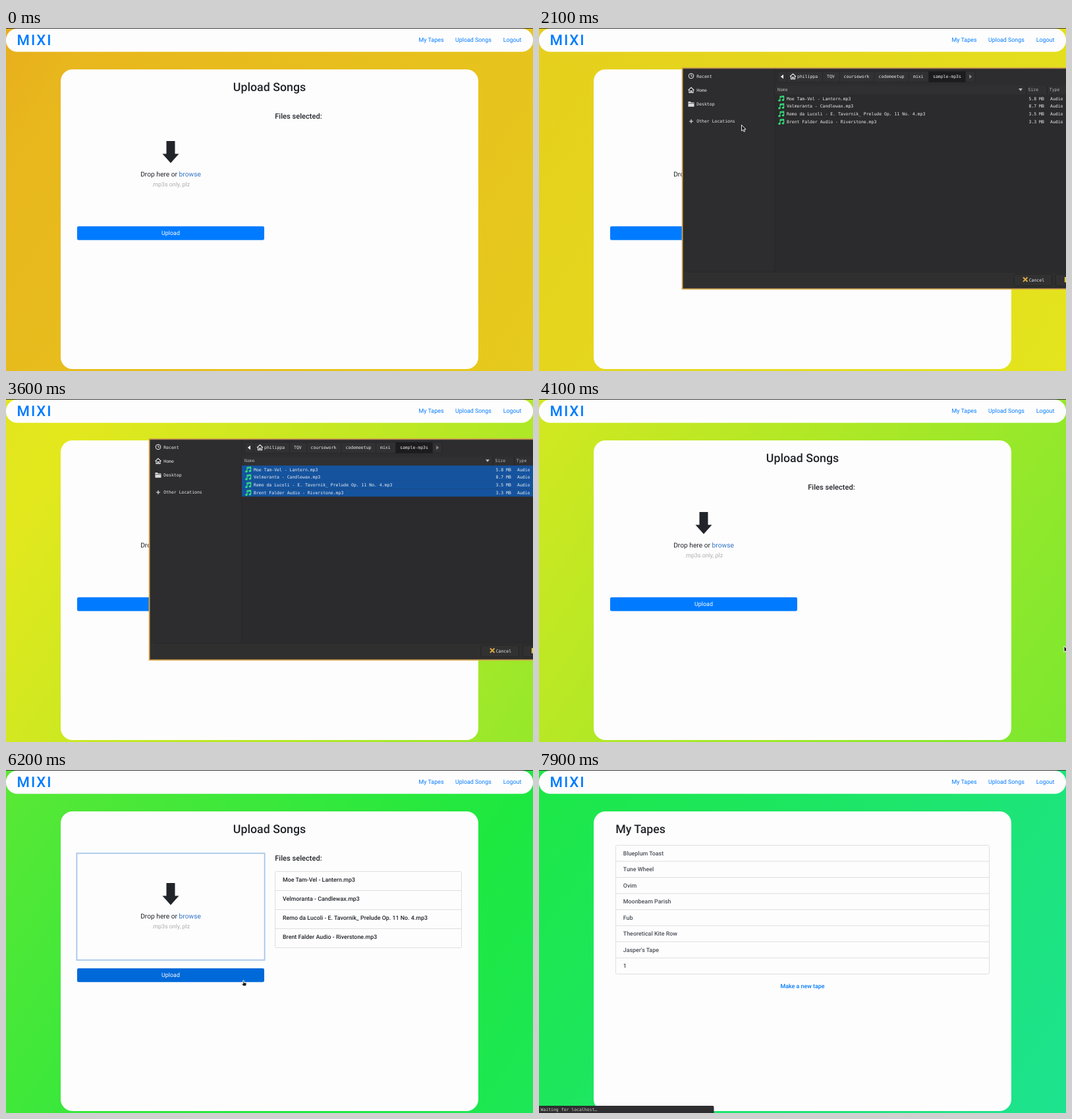
These frames come from a looping animation (800 by 522 pixels, 8000 ms). An HTML page:

```html
<!DOCTYPE html>
<html lang="en">
<head>
<meta charset="utf-8">
<title>Upload Songs</title>
<style>
html, body { margin: 0; width: 100%; height: 100%; overflow: hidden; background: #333; }
svg { display: block; width: 800px; height: 522px; text-rendering: geometricPrecision; }
text { font-family: Roboto, sans-serif; white-space: pre; }
.med { font-weight: 500; }
.mono { font-family: "DejaVu Sans Mono", monospace; }
</style>
</head>
<body>
<svg id="stage" viewBox="0 0 800 522" xmlns="http://www.w3.org/2000/svg">
  <defs>
    <linearGradient id="rainbow" gradientUnits="userSpaceOnUse">
      <stop offset=".125" stop-color="#e81d1d"/>
      <stop offset=".25" stop-color="#e8b71d"/>
      <stop offset=".375" stop-color="#e3e81d"/>
      <stop offset=".5" stop-color="#1de840"/>
      <stop offset=".625" stop-color="#1ddde8"/>
    </linearGradient>
    <g id="note" fill="none" stroke="#35e27c" stroke-width="1.2">
      <path d="M3 7.5V1.2L8.6 .6V6.6M3 2.6L8.6 2"/>
      <ellipse cx="1.9" cy="7.5" rx="1.2" ry=".9" fill="#35e27c"/>
      <ellipse cx="7.4" cy="6.7" rx="1.2" ry=".9" fill="#35e27c"/>
    </g>
    <path id="house" d="M0 4.6L4.5 .5L9 4.6M1.5 4V8.5H3.7V5.6H5.3V8.5H7.5V4" fill="none" stroke="#eee" stroke-width="1.1"/>
  </defs>
</svg>
<script>
const NS = "http://www.w3.org/2000/svg";
const stage = document.getElementById("stage");
const rainbow = document.getElementById("rainbow");
const LOOP = 8000, STEP = 100;
const REM = 800 / 90;
const INK = "#212529", BLUE = "#007bff", PAPER = "#fefdfe";

function add(parent, tag, attrs, content) {
  const el = document.createElementNS(NS, tag);
  for (const k in attrs) el.setAttribute(k, attrs[k]);
  if (content) el.textContent = content;
  parent.appendChild(el);
  return el;
}
const group = parent => add(parent, "g", {});
const rect = (p, x, y, width, height, fill, more) =>
  add(p, "rect", { x, y, width, height, fill, ...more });
const path = (p, d, fill, more) => add(p, "path", { d, fill, ...more });
const text = (p, x, y, str, size = REM, fill = INK, more = {}) =>
  add(p, "text", { x, y, "font-size": size, fill, ...more }, str);
const mono = (p, x, y, str, fill = "#eee") => text(p, x, y, str, 6.48, fill, { class: "mono" });
const med = { class: "med" };
const mid = { "text-anchor": "middle" };

function listBox(p, x, y, w, row, items, ink, pad, drop) {
  const line = { stroke: "#dfdfdf", "stroke-width": 1 };
  rect(p, x, y, w, row * items.length, "none", { rx: 2, ...line });
  items.forEach((item, i) => {
    if (i) path(p, `M${x} ${y + row * i}h${w}`, "none", line);
    text(p, x + pad, y + row * i + drop, item, REM, ink, med);
  });
}

const songs = [
  ["Moe Tam-Vel - Lantern.mp3", "5.8 MB"],
  ["Velmoranta - Candlewax.mp3", "8.7 MB"],
  ["Remo da Lucoli - E. Tavornik_ Prelude Op. 11 No. 4.mp3", "3.5 MB"],
  ["Brent Falder Audio - Riverstone.mp3", "3.3 MB"]
];
const tapes = ["Blueplum Toast", "Tune Wheel", "Ovim", "Moonbeam Parish", "Fub",
  "Theoretical Kite Row", "Jasper's Tape", "1"];

// Page frame
rect(stage, 0, 0, 800, 522, "#3a3a3a");
rect(stage, 0, 1, 800, 521, "url(#rainbow)");
rect(stage, 0, 1, 800, 35.3, PAPER, { rx: 17 });
text(stage, 16.6, 26, "MIXI", 2.5 * REM, BLUE, { ...med, "letter-spacing": 1.9 });
[[626.6, "My Tapes"], [682, "Upload Songs"], [754.7, "Logout"]]
  .forEach(([x, s]) => text(stage, x, 21.2, s, REM, BLUE));
rect(stage, 83, 63, 634, 456, PAPER, { rx: 18 });

// Upload page
const upload = group(stage);
text(upload, 400, 96.3, "Upload Songs", 2 * REM, INK, { ...med, ...mid });
text(upload, 408.2, 137.9, "Files selected:", 1.25 * REM, INK, med);
const zone = rect(upload, 107.4, 126.7, 285.2, 162.6, "none", { stroke: "#a6c5ea", "stroke-width": 1.8 });
path(upload, "M243.5 172H256.5V191.5H262.5L250 205.5L237.5 191.5H243.5Z", INK);
const prompt = text(upload, 250, 225.5, "Drop here or ", 1.15 * REM, INK, mid);
add(prompt, "tspan", { fill: "#3174c4" }, "browse");
text(upload, 250, 240.6, ".mp3s only, plz", REM, "#adadad", mid);
const button = rect(upload, 108, 301.8, 284, 21, BLUE, { rx: 2.2 });
text(upload, 250, 315.2, "Upload", REM, "#fff", mid);
const picked = group(upload);
listBox(picked, 408.5, 154.5, 283, 29, songs.map(s => s[0]), INK, 11.5, 15.3);

// Tapes page
const tapePage = group(stage);
text(tapePage, 116.2, 96.3, "My Tapes", 2 * REM, INK, med);
listBox(tapePage, 116.5, 114.5, 567, 24.5, tapes, "#495057", 11.3, 15.3);
text(tapePage, 400, 332.2, "Make a new tape", REM, BLUE, { ...med, ...mid });
const status = group(stage);
path(status, "M0 511H263.5Q265.5 511 265.5 513V522H0Z", "#2f2e30");
mono(status, 2.5, 518.8, "Waiting for localhost…", "#d0d0d0");

// File chooser
const dialog = group(stage);
rect(dialog, 217.6, 60.8, 600, 336.4, "#2d2c2e", { stroke: "#d3a64e", "stroke-width": 1.8 });
rect(dialog, 219, 62.2, 581, 1, "#3a393b");
rect(dialog, 358, 87.5, 442, 13.5, "#302f31");
rect(dialog, 358, 101, 442, 269.5, "#2b2a2c");
rect(dialog, 219, 370.5, 581, 25.5, "#2f2f2f");
rect(dialog, 225, 371, 575, .8, "#262626");
rect(dialog, 357.4, 62.5, .8, 308, "#262527");

add(dialog, "circle", { cx: 231, cy: 73, r: 3.8, fill: "none", stroke: "#eee", "stroke-width": 1 });
path(dialog, "M231 70.6V73.3H233", "none", { stroke: "#eee", "stroke-width": .9 });
add(dialog, "use", { href: "#house", x: 226.5, y: 90 });
path(dialog, "M226.5 112H230L231 113.2H235.5V119.8H226.5Z", "#ddd");
path(dialog, "M227 114.7H235.5", "none", { stroke: "#2d2c2e", "stroke-width": .7 });
path(dialog, "M228 142H234M231 139V145", "none", { stroke: "#eee", "stroke-width": 1.1 });
[[75.5, "Recent"], [96.8, "Home"], [118.2, "Desktop"], [144.2, "Other Locations"]]
  .forEach(([y, s]) => mono(dialog, 239.3, y, s));

rect(dialog, 362, 66, 300, 16.5, "#313032", { rx: 2, stroke: "#252426", "stroke-width": .7 });
rect(dialog, 591, 66, 56.5, 16.5, "#1c1b1d");
[376, 430, 456, 508.5, 561, 591, 647.5].forEach(x => rect(dialog, x, 66, .7, 16.5, "#252426"));
path(dialog, "M371 70.8V77.2L366.8 74Z", "#eee");
path(dialog, "M653.2 70.8V77.2L657.2 74Z", "#888");
add(dialog, "use", { href: "#house", x: 381, y: 69.3 });
[[392, "philippa"], [437, "TQV"], [462.5, "coursework"], [515.5, "codemeetup"], [568, "mixi"], [598, "sample-mp3s"]]
  .forEach(([x, s]) => mono(dialog, x, 76.4, s));

[[362, "Name"], [742.5, "Size"], [774.8, "Type"]].forEach(([x, s]) => mono(dialog, x, 96.4, s, "#b5b5b5"));
path(dialog, "M728 92H734L731 96Z", "#bbb");
const bars = songs.map(([name, size], i) => {
  const y = 101.2 + 11.8 * i;
  const bar = rect(dialog, 358, y, 442, 11.9, "#15539e");
  add(dialog, "use", { href: "#note", x: 363, y: y + 1.6 });
  mono(dialog, 376, y + 8.4, name);
  mono(dialog, 743.5, y + 8.4, size);
  mono(dialog, 776, y + 8.4, "Audio");
  return bar;
});
[739, 771].forEach(x => rect(dialog, x, 88, .7, 13, "#1f1e20"));

[[721, 57.5], [784, 40]].forEach(([x, w]) =>
  rect(dialog, x, 374.5, w, 18, "#313132", { rx: 2, stroke: "#222", "stroke-width": .8 }));
path(dialog, "M735 379.5L741.5 386M741.5 379.5L735 386", "none", { stroke: "#d9ab3c", "stroke-width": 2 });
mono(dialog, 743.7, 386.3, "Cancel");
rect(dialog, 797.8, 379, 2.2, 8, "#e3c04c");

// Pointers
const outline = { stroke: "#fff", "stroke-width": .9, "stroke-linejoin": "round" };
const arrow = path(stage, "M0 0V9.2L2.1 7.3L3.6 10.4L5.1 9.7L3.7 6.7H6.5Z", "#1a1a1a", outline);
const hand = path(stage, "M-.8 -3.6Q0 -4.4 .7 -3.6V-.6L4 0Q4.8 .3 4.6 1.4L4 4.8H-.4L-3 1.4Q-2.6 .4 -.8 1.6Z", "#1a1a1a", outline);

// [time, x, y]
const moves = [
  [700, 804, 262], [1000, 560, 240], [1300, 300, 198], [1500, 243, 187], [1900, 243, 187],
  [2300, 372, 108], [2400, 372, 108], [2700, 390, 142], [3000, 390, 142],
  [3600, 806, 383], [4000, 806, 381], [4100, 797, 376], [4500, 768, 374], [5300, 768, 374],
  [5900, 400, 330], [6200, 360.5, 324], [7300, 360.5, 324]
];
// [time, position along the rainbow]
const drift = [[0, .243], [1600, .29], [2900, .345], [4100, .385], [5100, .42], [6200, .461], [7900, .504]];

function track(keys, t, col) {
  const i = keys.findIndex(k => k[0] > t);
  if (i === 0) return keys[0][col];
  if (i < 0) return keys[keys.length - 1][col];
  const a = keys[i - 1], b = keys[i];
  return a[col] + (b[col] - a[col]) * (t - a[0]) / (b[0] - a[0]);
}
const show = (el, on) => el.setAttribute("visibility", on ? "inherit" : "hidden");
const within = (t, a, b) => t >= a && t < b;

function draw(t) {
  const len = 17192, dx = .829, dy = .559, from = -track(drift, t, 1) * len, to = from + len;
  const ends = { x1: from * dx, y1: from * dy, x2: to * dx, y2: to * dy };
  for (const k in ends) rainbow.setAttribute(k, ends[k]);

  const x = track(moves, t, 1), y = track(moves, t, 2);
  const chooser = within(t, 2000, 3800);
  const hasFiles = t >= 4500;
  const done = t >= 7300;
  const live = within(t, 700, 7300);
  const inZone = live && !chooser && x > 107 && x < 393 && y > 126 && y < 290;
  const onButton = live && !chooser && x > 108 && x < 392 && y > 301 && y < 325;

  show(upload, !done);
  show(tapePage, done);
  show(status, t >= 7500);
  show(dialog, chooser);
  show(zone, !done && (inZone || hasFiles));
  show(picked, !done && hasFiles);
  button.setAttribute("fill", onButton ? "#0069d9" : BLUE);
  bars.forEach((bar, i) => show(bar, chooser && t >= 2400 + 100 * i));

  const pointing = inZone || onButton;
  show(arrow, live && !pointing);
  show(hand, live && pointing);
  for (const el of [arrow, hand]) el.setAttribute("transform", `translate(${x} ${y})`);
}

const start = performance.now();
function tick() {
  const t = (performance.now() - start) % LOOP;
  draw(Math.floor(t / STEP) * STEP);
  requestAnimationFrame(tick);
}
tick();
</script>
</body>
</html>
```
